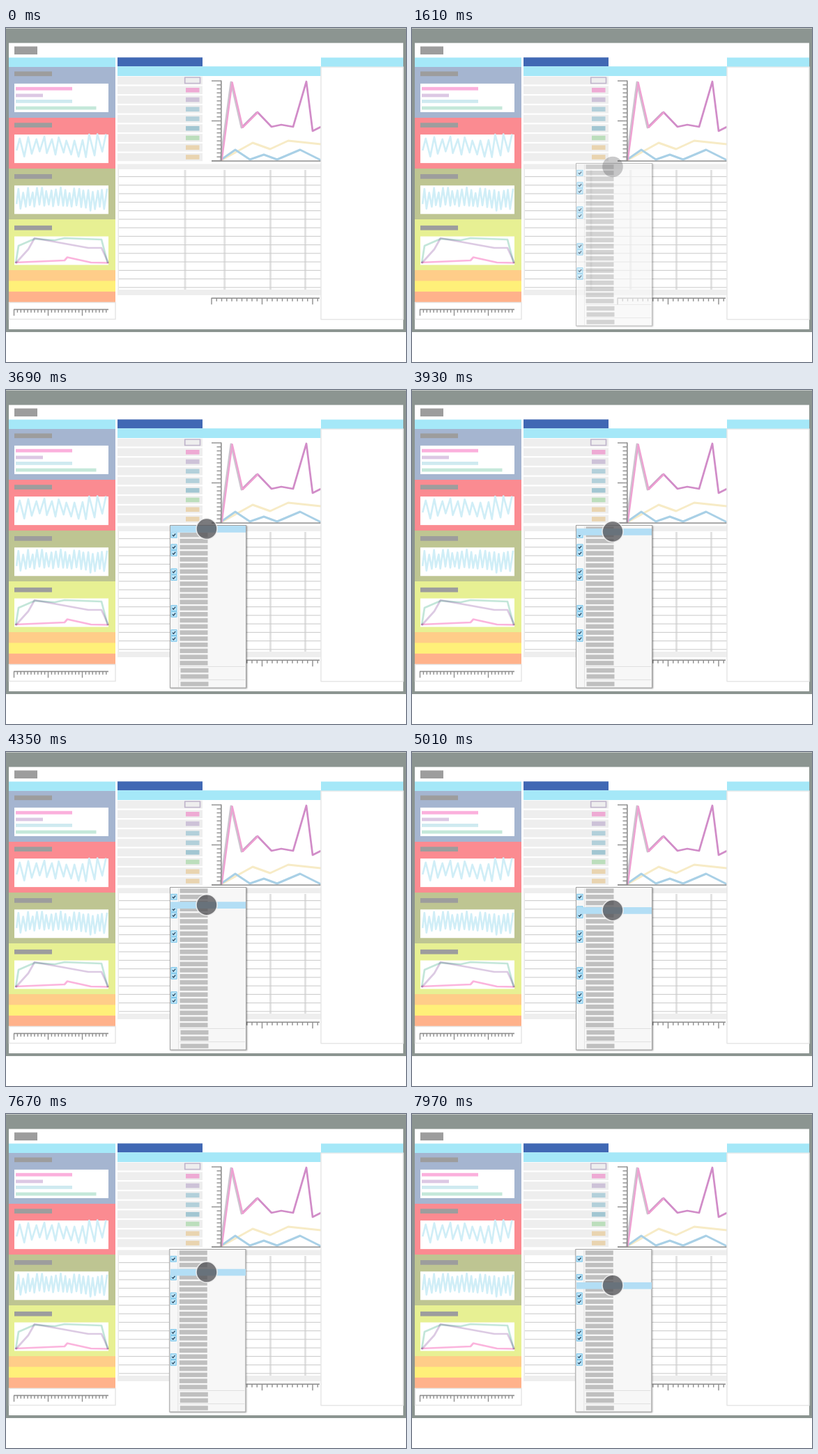
An HTML page with a canvas that plays this animation: 574x480 px, repeating every 8000 ms.

```html
<!DOCTYPE html>
<html lang="en">
<head>
<meta charset="utf-8">
<title>Dashboard menu</title>
<style>
html, body { margin: 0; width: 574px; height: 480px; overflow: hidden; background: #fff; }
canvas { display: block; }
</style>
</head>
<body>
<canvas id="stage" width="574" height="480"></canvas>
<script>
const W = 574, H = 480, LOOP = 8000, STEP = 30;
const CYAN = '#a5e8f8', INK = '#8e8e8e', LABEL = '#9d9d9d', PALE = '#eee', EDGE = '#e6e6e6';
const stage = document.getElementById('stage').getContext('2d');

function layer(paint) {
  const c = document.createElement('canvas');
  c.width = W;
  c.height = H;
  paint(c.getContext('2d'));
  return c;
}

// Filled box given by its left, top, right and bottom edges.
function box(g, color, x1, y1, x2, y2) {
  g.fillStyle = color;
  g.fillRect(x1, y1, x2 - x1, y2 - y1);
}

// Horizontal bar centred on y.
function bar(g, color, x1, x2, y, h) {
  box(g, color, x1, y - h / 2, x2, y + h / 2);
}

function frame(g, color, lw, x1, y1, x2, y2) {
  g.strokeStyle = color;
  g.lineWidth = lw;
  g.strokeRect(x1, y1, x2 - x1, y2 - y1);
}

function line(g, color, lw, pts) {
  g.strokeStyle = color;
  g.lineWidth = lw;
  g.lineJoin = 'round';
  g.beginPath();
  pts.forEach(([x, y]) => g.lineTo(x, y));
  g.stroke();
}

function random(seed) {
  return () => (seed = (seed * 16807) % 2147483647) / 2147483647;
}

// Jagged line that alternates between uneven peaks and dips.
function zigzag(g, n, mid, seed) {
  const rnd = random(seed), pts = [];
  for (let i = 0; i < n; i++) {
    const swing = 7 + 10 * rnd();
    pts.push([14 + 133 * (i + .5 * rnd()) / n, mid + (i % 2 ? -swing : swing)]);
  }
  line(g, '#d0eef7', 2.7, pts);
}

function ruler(g, x, end, y, gap) {
  box(g, INK, x, y - .8, end, y + .8);
  for (let i = 0; x + i * gap < end; i++) {
    const px = x + i * gap;
    box(g, INK, px - .2, y, px + 1.2, y + (i % 10 ? 4.5 : 9));
  }
}

function sidebar(g) {
  box(g, CYAN, 4, 42.5, 157, 56);
  ['#a5b5d0', '#fb8b91', '#bec592', '#e7f093', '#ffcd89', '#fff079', '#ffb28b'].forEach((c, i) => {
    box(g, c, 4, i < 4 ? 56 + 73 * i : 348 + 15.4 * (i - 4), 157, 394);
  });
  box(g, '#fff', 4, 394, 157, 419);
  frame(g, EDGE, 1.5, 4.5, 394.5, 157, 418.5);
  for (let i = 0; i < 4; i++) {
    bar(g, LABEL, 12, 66, 65.8 + 73.8 * i, 6.7);
    bar(g, '#fff', 12, 147, 100.4 + 73.2 * i, 41);
  }
  bar(g, '#fbb0dc', 14, 95, 87.2, 4.8);
  bar(g, '#dcc8e4', 14, 53, 96.9, 4.8);
  bar(g, '#cfeaf0', 14, 95, 105.4, 4.8);
  bar(g, '#c4e8da', 14, 129.5, 115, 4.8);

  zigzag(g, 24, 169, 11);
  zigzag(g, 40, 246, 5);
  g.globalCompositeOperation = 'multiply';
  line(g, '#c3e6d9', 2.7, [[14, 338], [18, 313], [41, 303], [70, 305], [84, 302], [137, 304], [146, 338]]);
  line(g, '#dccae3', 2.7, [[14, 338], [32, 318], [41, 302], [118, 316], [137, 316], [147, 338]]);
  line(g, '#fbb4dd', 2.7, [[13, 337], [84, 334], [88, 329.5], [122, 337], [147, 337.5]]);
  g.globalCompositeOperation = 'source-over';
  ruler(g, 11, 147, 404.5, 4.9);
}

function chart(g) {
  const trend = [[309, 190], [324, 78], [339, 143], [361, 121], [381, 142], [395, 139],
    [412, 142], [431, 77], [440, 148], [452, 142]];
  const rise = dx => trend.slice(0, 4).map(([x, y]) => [x + dx, y]);
  line(g, '#f7ebc6', 3, [[309, 190], [354, 165], [379, 174], [405, 162], [452, 167]]);
  line(g, '#a9d0e6', 3, [[309, 189], [329, 175], [350, 189], [370, 182], [389, 189], [422, 175], [452, 190]]);
  line(g, '#cdc3cf', 3, rise(-1));
  line(g, '#d18cc8', 2.7, trend.slice(2));
  line(g, '#efa0d2', 2.2, rise(.7));
  box(g, INK, 308, 75.5, 309.6, 191.5);
  for (let i = 0; i <= 20; i++) bar(g, INK, i % 10 ? 302.5 : 295, 309, 76 + i * 5.75, 1.4);
  bar(g, INK, 295, 452, 191.2, 1.5);
  ruler(g, 294.5, 450, 388.3, 7.25);
}

function middle(g) {
  box(g, '#4068b4', 160, 42.3, 282, 55.2);
  box(g, CYAN, 160, 55.2, 452, 69);
  const swatches = ['#eeaad4', '#cdc2d8', '#b2d0da', '#b2d0da', '#a2c6d2', '#bcdebc', '#e9d4b0', '#e9d4b0'];
  for (let i = 0; i < 9; i++) {
    const y = 75.5 + i * 13.75;
    bar(g, PALE, 160, 282, y, 11.6);
    if (i) bar(g, swatches[i - 1], 258, 277.5, y, 6.6);
  }
  frame(g, '#c0b5cc', 1.7, 256.7, 71, 278.5, 79.5);

  bar(g, PALE, 160, 452, 199.2, 7.5);
  bar(g, PALE, 160, 452, 380, 8);
  [257, 313.7, 379.5, 429.5].forEach(x => box(g, '#e2e2e2', x - 1.5, 204, x + 1.5, 376));
  box(g, '#e8e8e8', 160.5, 203, 162, 376);
  for (let i = 0; i < 14; i++) bar(g, '#cdcdcd', 162, 452, 213.6 + i * 12.25, 1.1);
}

const page = layer(g => {
  box(g, '#fff', 0, 0, W, H);
  box(g, '#8c9591', 0, .5, W, 437);
  box(g, '#fff', 4, 21.5, 570, 433);
  box(g, LABEL, 12, 26.5, 45, 38);
  sidebar(g);
  middle(g);
  chart(g);
  box(g, '#fff', 452, 55.5, 570, 419);
  frame(g, EDGE, 1.5, 452, 56, 570, 418.7);
  box(g, CYAN, 452, 42.5, 570, 55.5);
});

const rowY = i => 199.5 + i * 8.77;

function menu(checked, dx) {
  return layer(g => {
    g.translate(dx, 0);
    g.save();
    g.shadowColor = 'rgba(0,0,0,.4)';
    g.shadowBlur = 2;
    g.shadowOffsetX = g.shadowOffsetY = 1;
    box(g, '#f7f7f7', 235, 194, 345, 428);
    g.restore();
    frame(g, '#a2a2a2', 1, 235.5, 194.5, 344.5, 428);
    box(g, '#e2e2e2', 247, 196, 248, 427);
    [397.5, 416.5].forEach(y => bar(g, '#e0e0e0', 249, 343, y, 1));
    for (let i = 0; i < 23; i++) bar(g, '#bfbfbf', 249.5, 289.5, rowY(i), 6.4);
    [403, 411.7, 422.5].forEach(y => bar(g, '#bfbfbf', 250.5, 290.5, y, 6.4));
    checked.forEach(i => {
      const y = rowY(i);
      bar(g, '#c0e6f8', 236.5, 245.5, y, 8.6);
      frame(g, '#7cc6ea', 1, 237, y - 3.9, 245, y + 3.9);
      line(g, '#2a4a64', 1.3, [[238.8, y], [240.4, y + 1.7], [243.2, y - 1.8]]);
    });
  });
}

const checked = [1, 3, 4, 7, 8, 13, 14, 17, 18];
const menuBefore = menu(checked, 0);
const menuAfter = menu(checked.filter(i => i !== 3), -.7);

const ramp = (t, from, to) => Math.min(1, Math.max(0, (t - from) / (to - from)));
const ease = p => (1 - Math.cos(Math.PI * p)) / 2;

function draw(ms) {
  const t = ms < 500 ? 0 : 500 + STEP * Math.floor((ms - 500) / STEP);
  const g = stage;
  const second = t >= 5010;
  const press = second ? ramp(t, 6240, 6510) : ramp(t, 2360, 2630);
  const y = second
    ? 227 + 86 * ease(ramp(t, 7640, 8690))
    : 199.5 + 28 * ease(ramp(t, 3660, 4710));

  g.globalAlpha = 1;
  g.drawImage(page, 0, 0);
  g.globalAlpha = ramp(t, 1300, 1760);
  g.drawImage(second ? menuAfter : menuBefore, 0, 0);

  // The toggled row stays faintly lit until the next press.
  if (second) {
    g.globalAlpha = .9 * (1 - press);
    bar(g, '#e8f1ed', 236, 344, 226, 10);
  }
  g.globalAlpha = press;
  bar(g, '#b3def5', 236, 344, y + .4, 9.7);

  const rest = second ? .15 : .3;
  g.globalAlpha = ramp(t, 470, 1280) * (rest + (.76 - rest) * press);
  g.fillStyle = '#505054';
  g.beginPath();
  g.arc(288, y, 14.8, 0, 2 * Math.PI);
  g.fill();
  g.globalAlpha = .85 * press;
  g.strokeStyle = '#f0f0f0';
  g.lineWidth = 1.6;
  g.beginPath();
  g.arc(288, y, 15, 0, 2 * Math.PI);
  g.stroke();
}

const start = performance.now();
function tick() {
  draw((performance.now() - start) % LOOP);
  requestAnimationFrame(tick);
}
tick();
</script>
</body>
</html>
```
